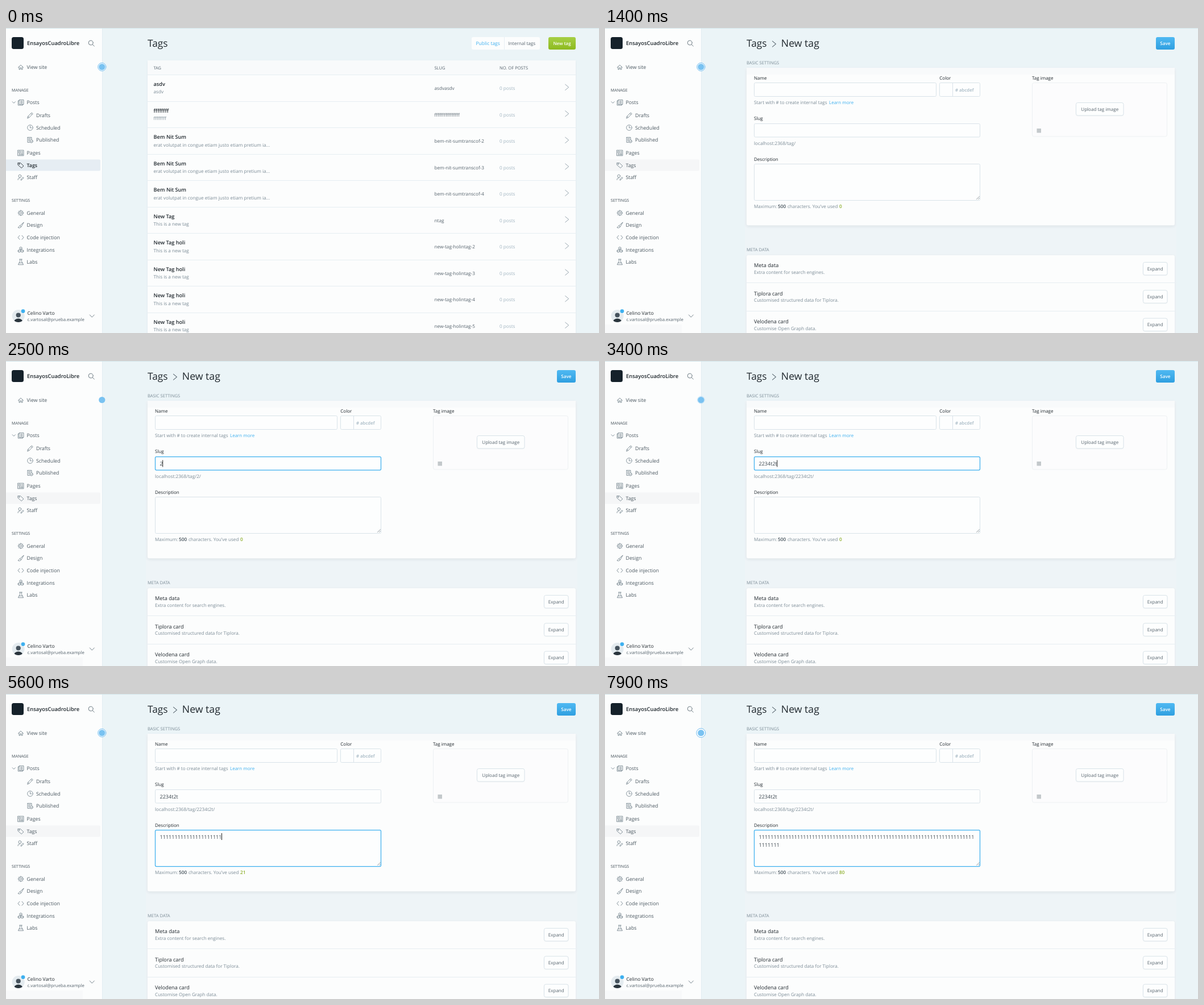
Write an HTML page with a canvas that moves like this. It is 1043 px wide and 537 px high and loops after 8 s.

```html
<!DOCTYPE html>
<html lang="en">
<head>
<meta charset="utf-8">
<title>New tag form</title>
<style>
html, body { margin: 0; width: 100%; height: 100%; overflow: hidden; background: #ebf4f7; }
canvas { display: block; width: 1043px; height: 537px; }
</style>
</head>
<body>
<canvas id="stage"></canvas>
<script>
const W = 1043, H = 537, LOOP = 8000, STEP = 100;
const canvas = document.getElementById('stage');
const ctx = canvas.getContext('2d');
const ratio = window.devicePixelRatio || 1;
canvas.width = Math.round(W * ratio);
canvas.height = Math.round(H * ratio);

const FONT = '"Open Sans", "Noto Sans", sans-serif';
const INK = '#20282e', BODY = '#56636d', MUTED = '#7b8b96', PALE = '#a3b6c2';
const BLUE = '#3eb0ef', LINE = '#d9e3e9', PAPER = '#fcfdfd', ICON = '#71818b';

// Timeline in ms
const OPEN_FORM = 500, FOCUS_SLUG = 2000, HOVER_ITEM = 2100, TYPE_SLUG = 2500;
const FOCUS_TEXT = 3600, FIRST_KEY = 4300, REPEAT = 4960, KEYS_PER_MS = 0.0326;
const SLUG = '2234t2t', KEY_GAP = 120, MAX_KEYS = 80, PER_LINE = 73;

function text(s, x, y, size, color = BODY, weight = 400, align = 'left') {
  ctx.font = `${weight} ${size}px ${FONT}`;
  ctx.textAlign = align;
  ctx.fillStyle = color;
  ctx.fillText(s, x, y);
}

function rect(x, y, w, h, color) {
  ctx.fillStyle = color;
  ctx.fillRect(x, y, w, h);
}

function box(x, y, w, h, r, fill, stroke, width = 1) {
  ctx.beginPath();
  ctx.roundRect(x, y, w, h, r);
  if (fill) { ctx.fillStyle = fill; ctx.fill(); }
  if (stroke) { ctx.strokeStyle = stroke; ctx.lineWidth = width; ctx.stroke(); }
}

function disc(x, y, r, fill) {
  ctx.beginPath();
  ctx.arc(x, y, r, 0, Math.PI * 2);
  ctx.fillStyle = fill;
  ctx.fill();
}

function shaded(alpha, blur, dy, draw) {
  ctx.save();
  ctx.shadowColor = `rgba(40, 60, 75, ${alpha})`;
  ctx.shadowBlur = blur * ratio;
  ctx.shadowOffsetY = dy * ratio;
  draw();
  ctx.restore();
}

function lines(path, x, y, color = ICON, width = 0.85) {
  ctx.save();
  ctx.translate(x, y);
  ctx.strokeStyle = color;
  ctx.lineWidth = width;
  ctx.lineJoin = ctx.lineCap = 'round';
  ctx.stroke(new Path2D(path));
  ctx.restore();
}

function clipped(x, y, w, h, draw) {
  ctx.save();
  ctx.beginPath();
  ctx.rect(x, y, w, h);
  ctx.clip();
  draw();
  ctx.restore();
}

function gradient(y0, y1, a, b) {
  const g = ctx.createLinearGradient(0, y0, 0, y1);
  g.addColorStop(0, a);
  g.addColorStop(1, b);
  return g;
}

const ring = (x, y, r) => `M${x + r} ${y}a${r} ${r} 0 1 1 ${-2 * r} 0a${r} ${r} 0 1 1 ${2 * r} 0`;

const ICONS = {
  home: 'M-4.5 .5L0 -4L4.5 .5M-3 -.8V4H-1V1H1V4H3V-.8',
  posts: 'M-2.5 -4.5H5V3.5H-2.5ZM-2.5 -3H-4.7V5H3.5V3.5M-.5 -2.3H3M-.5 -.4H3M-.5 1.5H3',
  pencil: 'M-4.8 4.8L-3.8 1.6L2.8 -4.8L4.8 -2.8L-1.8 3.8ZM1.2 -3.2L3.2 -1.2M-3.8 1.6L-1.8 3.8',
  clock: ring(0, 0, 4.8) + 'M0 -3V.3H2.5',
  done: 'M-4.5 -4.7H2.5V-1M-4.5 -4.7V4.2H-1M-2.8 -2.6H.8M-2.8 -.6H-.6M-2.8 1.5H-1.4' +
    ring(2.2, 2.2, 2.7) + 'M1 2.2L2 3.2L3.5 1.4',
  pages: 'M-5 -4.8H5V4.8H-5ZM-3.2 -3H-.6V-.3H-3.2ZM1.2 -2.6H3.4M1.2 -.6H3.4M-3.2 1.6H-.6M-3.2 3.2H-.6M1.2 1.4H3.4V3.2H1.2Z',
  tag: 'M-4.8 -4.2H-.6L5 1.2L1.2 4.8L-4.8 -.4Z' + ring(-2.7, -2.2, 0.8),
  staff: ring(-1.6, -2.3, 2.4) + 'M-5 4.3C-5 1.8 -3.4 .9 -1.2 1M.2 4.7L.9 2.6L4 -.4L5.2 .9L2.2 4Z',
  gear: ring(0, 0, 1.8) + ring(0, 0, 3.9) +
    'M0 -5V-3.9M0 5V3.9M-5 0H-3.9M5 0H3.9M-3.5 -3.5L-2.8 -2.8M3.5 3.5L2.8 2.8M-3.5 3.5L-2.8 2.8M3.5 -3.5L2.8 -2.8',
  brush: 'M5 -4.9L-1.5 1L.4 2.7ZM-1.5 1C-3.6 1 -3.2 3.5 -5 4.2C-2.8 5.2 .4 4.9 .4 2.7',
  code: 'M-2 -3.5L-5 0L-2 3.5M2 -3.5L5 0L2 3.5',
  blocks: ring(0, -2.5, 2.3) + ring(-2.6, 2.3, 2.3) + ring(2.6, 2.3, 2.3) + 'M0 -2.5V-.2M-2.6 2.3H-4.8M2.6 2.3H4.8',
  flask: 'M-2.3 -4.8H2.3M-1.4 -4.8V-1.2L-4.6 4.7H4.6L1.4 -1.2V-4.8M-2.9 1.6H2.9'
};

// label, icon, icon x, centre y
const MENU = [
  ['View site', 'home', 26, 69], ['Posts', 'posts', 26, 131],
  ['Drafts', 'pencil', 42.5, 153.8], ['Scheduled', 'clock', 42.5, 175.5],
  ['Published', 'done', 42.5, 197.2], ['Pages', 'pages', 26, 220],
  ['Tags', 'tag', 26, 241.7], ['Staff', 'staff', 26, 263],
  ['General', 'gear', 26, 325.7], ['Design', 'brush', 26, 347.2],
  ['Code injection', 'code', 26, 368.8], ['Integrations', 'blocks', 26, 390.4],
  ['Labs', 'flask', 26, 412]
];

function sidebar(form) {
  rect(0, 0, 169, H, PAPER);
  rect(169, 0, 1, H, '#e2edf2');
  box(10, 16, 21, 21, 3.5, '#15212a');
  text('EnsayosCuadroLibre', 37, 30, 9.4, INK, 600);
  lines(ring(149.2, 26, 4) + 'M152.2 29L155.3 32', 0, 0, '#5f6f78', 0.9);

  box(-3, 231.5, 169, 20, 2, form ? '#f5f6f7' : '#e6edf3');
  for (const [label, icon, x, y] of MENU) {
    const on = label === 'Tags' && !form;
    lines(ICONS[icon], x, y, on ? INK : ICON);
    text(label, x + 10.5, y + 3.2, 8.8, on ? INK : '#4a5760', on ? 600 : 400);
  }
  lines('M-2.6 -1.3L0 1.3L2.6 -1.3', 13.8, 131);
  text('MANAGE', 10, 111.9, 7.1, '#404d56', 500);
  text('SETTINGS', 10, 306, 7.1, '#404d56', 500);

  if (form) rect(0, 522, 135, 15, '#f8f9fa');
  ctx.save();
  ctx.beginPath();
  ctx.arc(21.7, 507, 11, 0, Math.PI * 2);
  ctx.clip();
  rect(10, 495, 24, 24, '#e4ebef');
  disc(21.7, 505.5, 4.1, '#46535d');
  ctx.beginPath();
  ctx.ellipse(21.7, 517, 7.6, 5.4, 0, 0, Math.PI * 2);
  ctx.fillStyle = '#2a353d';
  ctx.fill();
  ctx.restore();
  disc(30, 498.6, 4.2, PAPER);
  disc(30, 498.6, 3.4, BLUE);
  text('Celino Varto', 37.5, 505, 8.5, INK, 500);
  text('c.vartosal@prueba.example', 37.5, 515.9, 7.75, BODY);
  lines('M-4 -2L0 2.2L4 -2', 151.3, 507, '#66767f', 0.9);
}

function beacon(t) {
  const q = ((t + 150) % 700) / 700;
  const x = 168.8, y = 68.5;
  if (q < 0.78) {
    const r = 5.5 + 2.5 * Math.sqrt(Math.min(1, q / 0.5));
    ctx.globalAlpha = Math.min(1, q * 5) * Math.min(1, (0.78 - q) * 4);
    disc(x, y, r, '#fafdff');
    lines(ring(x, y, r), 0, 0, '#72bdf0', 1);
    ctx.globalAlpha = 1;
  }
  disc(x, y, 5.6, '#79c2f1');
}

const LOREM = 'erat volutpat in congue etiam justo etiam pretium ia...';
const NEW = 'This is a new tag';
const ROWS = [['asdv', 'asdv', 'asdvasdv'], ['f'.repeat(8), 'f'.repeat(8), 'f'.repeat(16)]];
for (const n of [2, 3, 4]) ROWS.push(['Bem Nit Sum', LOREM, 'bem-nit-sumtranscof-' + n]);
ROWS.push(['New Tag', NEW, 'ntag']);
for (const n of [2, 3, 4, 5]) ROWS.push(['New Tag holi', NEW, 'new-tag-holintag-' + n]);

function list() {
  text('Tags', 249, 33.4, 17.3, INK);
  box(819, 16, 120, 22, 3, PAPER);
  rect(876, 16, 1, 22, '#e8eff3');
  text('Public tags', 826.5, 30.2, 8.45, BLUE);
  text('Internal tags', 883.5, 30.2, 8.2, BODY);
  box(954, 16, 48, 22, 3, gradient(16, 38, '#a6cf45', '#8dba1f'));
  text('New tag', 978, 30.2, 7.9, '#fff', 600, 'center');

  shaded(0.08, 3, 1, () => box(249, 57, 753, 500, 2, PAPER));
  rect(249, 57, 753, 25, '#f8fafb');
  text('TAG', 259.5, 72.6, 7.4);
  text('SLUG', 753.5, 72.6, 7.5);
  text('NO. OF POSTS', 868, 72.6, 7.6);
  ROWS.forEach(([name, about, slug], i) => {
    const y = 82 + 46.55 * i;
    rect(249, Math.round(y), 753, 1, '#e6eef2');
    text(name, 259.5, y + 20, 9.15, INK, 600);
    text(about, 259.5, y + 33.4, 8.2, MUTED);
    text(slug, 753.5, y + 27, 8.2, BODY);
    text('0 posts', 868, y + 27, 8.2, PALE);
    lines('M-3 -5L3 0L-3 5', 986.7, y + 22.3, '#8d9ca6', 0.9);
  });
}

function field(x, y, w, h, on, fill = '#fdfefe') {
  box(x, y, w, h, 2, fill, on ? BLUE : LINE, on ? 1.25 : 1);
}

function button(label, x, y, w) {
  shaded(0.05, 2, 1, () => box(x, y, w, 22.5, 3, '#fff'));
  box(x, y, w, 22.5, 3, '#fdfefe', '#d9e3e9');
  text(label, x + w / 2, y + 14.1, 8.05, BODY, 400, 'center');
}

function caret(x, y, since) {
  if (since % 1000 < 500) rect(x, y, 1, 12, '#222');
}

const CARDS = [
  ['Meta data', 'Extra content for search engines.'],
  ['Tiplora card', 'Customised structured data for Tiplora.'],
  ['Velodena card', 'Customise Open Graph data.']
];

function formBase() {
  text('Tags', 249, 33.4, 17.3, INK);
  lines('M-3 -5L3 0L-3 5', 297.5, 28.2, '#5c6972', 1.1);
  text('New tag', 309.8, 33.4, 17.7, INK);
  box(969, 16, 33, 22, 3, gradient(16, 38, '#4fb9f2', '#2f9fe0'));
  text('Save', 985.3, 30.2, 8.1, '#fff', 600, 'center');

  rect(246, 70, 759, H - 70, '#eef4f7');
  text('BASIC SETTINGS', 249, 63.6, 7.6, MUTED, 500);
  shaded(0.09, 5, 2, () => box(249, 70, 753, 277.5, 3, PAPER));
  rect(249, 70, 753, 12, '#f8fafb');
  [['Name', 262, 90.6], ['Color', 588.3, 90.6], ['Tag image', 751, 90.6],
   ['Slug', 262, 162], ['Description', 262, 233.5]]
    .forEach(([s, x, y]) => text(s, x, y, 8, INK, 500));
  field(262.5, 96.5, 320, 24);
  field(588.5, 96.5, 71, 24);
  rect(611, 97, 1, 23, LINE);
  text('# abcdef', 616, 111.6, 7.8, PALE, 600);
  text('Start with # to create internal tags', 262, 134.2, 8.15, MUTED);
  text('Learn more', 394, 134.2, 8, BLUE);

  box(751.5, 96.5, 237, 94.5, 3, '#fcfcfd', '#edf1f3');
  button('Upload tag image', 828.5, 131.5, 83.5);
  rect(759.5, 177, 7.5, 7.5, '#c3c8cb');

  text('META DATA', 249, 393, 7.6, MUTED, 500);
  shaded(0.07, 4, 1, () => box(249, 400, 753, 160, 3, PAPER));
  CARDS.forEach(([title, about], i) => {
    const y = 49.3 * i;
    if (i) rect(249, Math.round(399 + y), 753, 1, '#e6eef2');
    text(title, 262, 421.4 + y, 9.2, INK, 500);
    text(about, 262, 433.1 + y, 8.15, MUTED);
    button('Expand', 946.5, 412.5 + y, 42.5);
  });
}

const LONG = 'asdcasdcasd';
const CHOICES = [LONG + 'c'.repeat(61), 'pruebaasdcasc', '123', 'asdccccccc', '123-asdcsdcsdc', 'prueba'];

function choices(hover) {
  shaded(0.28, 4, 1, () => box(261.5, 194, 326.5, 165.5, 2, '#fdfdfd'));
  if (hover) rect(262, 198.5, 326, 25.7, '#e6e6e6');
  clipped(262, 194, 317.7, 165, () => {
    CHOICES.forEach((s, i) => text(s, 270, 214.4 + 25.8 * i, 8.5, '#202124', 600));
  });
}

function form(t) {
  formBase();
  const open = t >= FOCUS_SLUG && t < TYPE_SLUG;
  const hover = open && t >= HOVER_ITEM;
  const inSlug = t >= FOCUS_SLUG && t < FOCUS_TEXT;
  const inText = t >= FOCUS_TEXT;

  const typed = t < TYPE_SLUG ? 0 : Math.min(SLUG.length, 1 + Math.floor((t - TYPE_SLUG) / KEY_GAP));
  const slug = SLUG.slice(0, typed);
  field(262.5, 168.5, 397, 23.5, inSlug, hover ? '#e9f0fc' : undefined);
  if (hover) {
    clipped(270, 170, 382, 21, () => text(LONG + 'c'.repeat(90), 270, 184.2, 8.5, '#111'));
  } else {
    text(slug, 270.5, 183.8, 9.05, '#3b464e');
  }
  if (inSlug) {
    const last = typed ? TYPE_SLUG + (typed - 1) * KEY_GAP : FOCUS_SLUG;
    ctx.font = `400 9.05px ${FONT}`;
    caret(270 + ctx.measureText(slug).width, 174.5, t - last);
  }
  text('localhost:2368/tag/' + (slug ? slug + '/' : ''), 262, 205.7, 8.2, MUTED);

  let keys = t < FIRST_KEY ? 0 : 1;
  if (t >= REPEAT) keys = Math.min(MAX_KEYS, 1 + Math.floor((t - REPEAT) * KEYS_PER_MS));
  field(262.5, 239.5, 397, 64, inText);
  lines('M653.5 301.5L658.5 296.5M656.5 301.5L658.5 299.5', 0, 0, '#7d878d', 0.8);
  const first = '1'.repeat(Math.min(keys, PER_LINE));
  const second = '1'.repeat(Math.max(0, keys - PER_LINE));
  text(first, 270.5, 254.7, 9.09, '#3b464e');
  text(second, 270.5, 269, 9.09, '#3b464e');
  if (inText) {
    let last = keys ? FIRST_KEY : FOCUS_TEXT;
    if (keys > 1) last = keys < MAX_KEYS ? t : 7400;
    const width = ctx.measureText(second || first).width;
    caret(270 + width, second ? 259 : 245, t - last);
  }

  text('Maximum:', 262, 316.6, 8.15, MUTED);
  text('500', 304, 316.6, 8.3, '#46535c', 600);
  text('characters. You’ve used', 321, 316.6, 8.15, MUTED);
  text(String(keys), 412, 316.6, 8.3, '#8fb02f', 600);

  if (open) choices(hover);
}

function draw(ms) {
  const t = Math.floor((ms % LOOP) / STEP) * STEP;
  ctx.setTransform(ratio, 0, 0, ratio, 0, 0);
  ctx.textBaseline = 'alphabetic';
  ctx.textRendering = 'geometricPrecision';
  rect(0, 0, W, H, '#ebf4f7');
  const onForm = t >= OPEN_FORM;
  sidebar(onForm);
  if (onForm) form(t); else list();
  rect(0, 0, W, 1, '#d3e6ea');
  beacon(t);
}

const start = performance.now();
function tick(now) {
  draw(Math.max(0, now - start));
  requestAnimationFrame(tick);
}
draw(0);
requestAnimationFrame(tick);
</script>
</body>
</html>
```
